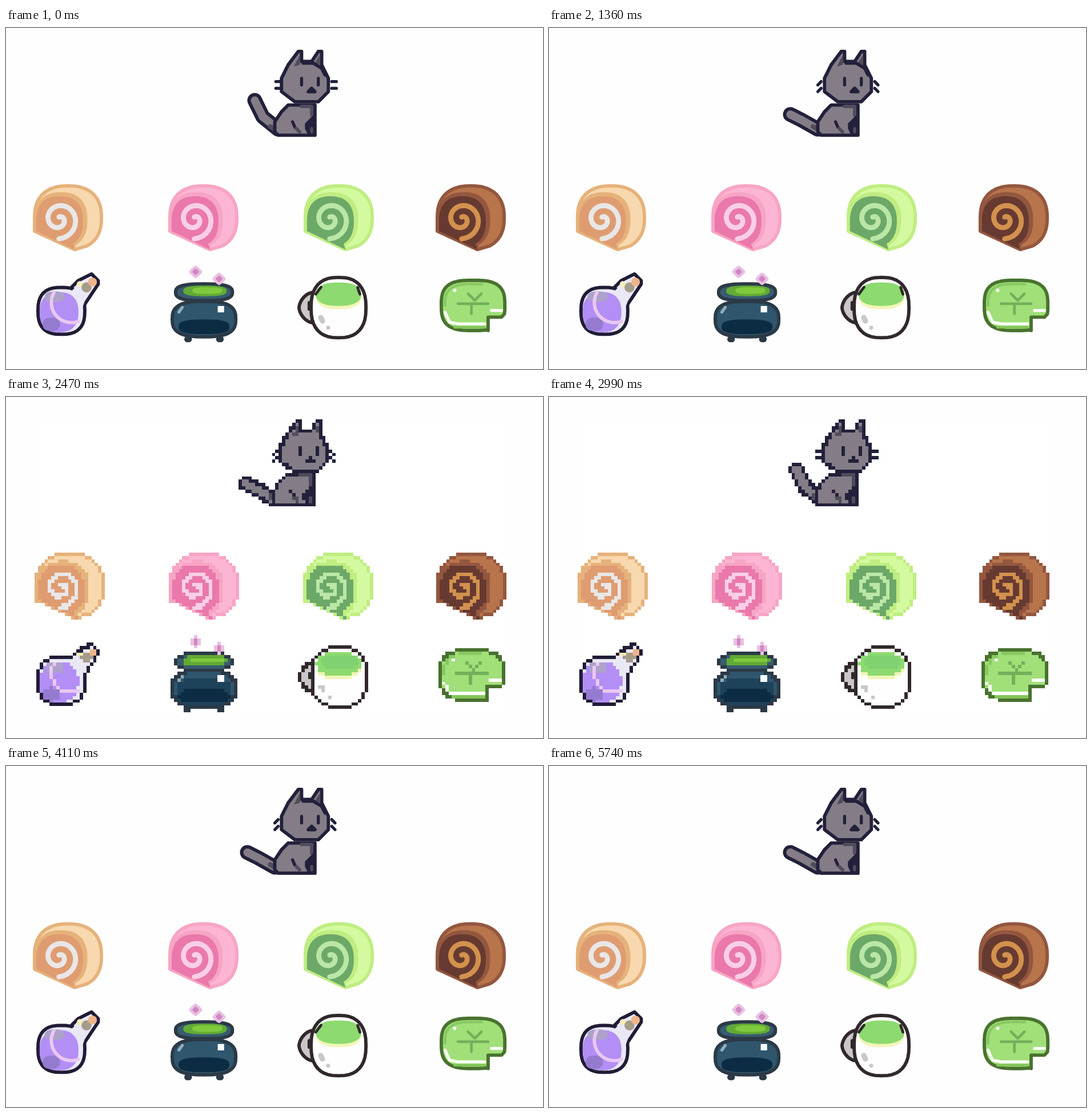
Animation, 940 px wide and 596 px high, one loop 5.77 s. Source, as an HTML page with a canvas:

```html
<!DOCTYPE html>
<html lang="en">
<head>
<meta charset="utf-8">
<title>Cat and treats</title>
<style>
html, body { margin: 0; width: 100%; height: 100%; overflow: hidden; background: #fefefe; }
canvas { display: block; width: 940px; height: 596px; }
</style>
</head>
<body>
<canvas id="stage" width="940" height="596"></canvas>
<script>
const CELL = 5.86;
const LOOP = 5770;
const TAIL_BEAT = 272;
const PIXEL_FROM = 1580, PIXEL_TO = 3750;

// Paths use cell units: whole coordinates are cell centres.
const shape = (d, fill, stroke, width, only) => ({ path: new Path2D(d), fill, stroke, width, only });
const area = (d, fill, only) => shape(d + 'z', fill, null, 1, only);
const line = (d, stroke, width = 1, only) => shape(d, null, stroke, width, only);
const outlined = (d, fill, stroke) => shape(d + 'z', fill, stroke, 1);
const dot = (x, y, color, size, only) => line(`M${x} ${y}h.01`, color, size, only);

// Samples a curve of t in 0..1 into an open path.
function curve(pointAt, steps = 40) {
  const points = Array.from({ length: steps + 1 }, (_, i) => pointAt(i / steps).map(v => v.toFixed(2)).join(' '));
  return 'M' + points.join('L');
}

// Superellipse arc in degrees: power 1 is a diamond, 2 an ellipse, more is boxier.
function blob(cx, cy, rx, ry, power = 2.4, from = 0, to = 360) {
  const bend = v => Math.sign(v) * Math.abs(v) ** (2 / power);
  return curve(t => {
    const angle = (from + (to - from) * t) * Math.PI / 180;
    return [cx + rx * bend(Math.cos(angle)), cy + ry * bend(Math.sin(angle))];
  });
}

function spiral(cx, cy, radius, turns) {
  return curve(t => {
    const angle = Math.PI / 2 - t * turns * 2 * Math.PI;
    const r = radius * (1 - t * .88);
    return [cx + r * Math.cos(angle), cy + r * Math.sin(angle)];
  });
}

function roll(border, light, face, cream) {
  const dome = (cx, cy, rx, ry) => blob(cx, cy, rx, ry, 2.4, 60, -180) + `L${cx - rx} 13.5L12 19`;
  return [
    outlined(dome(10, 9.5, 10, 9.5), light, border),
    area(dome(7.9, 10.2, 7.9, 8.3), border),
    area(dome(7.5, 10.6, 7, 7.5), face),
    line(spiral(7.3, 10, 5.8, 1.5), cream, 1.5),
  ];
}

function cat(tailDown) {
  const ink = '#22203a', fur = '#847d87', shade = '#514c5c';
  const tail = tailDown ? 'M1.8 18.8L5 20.4 10 23.2' : 'M4 14.6L6.4 19.5 11 23.2';
  const whiskers = [9, 11].map(row => tailDown
    ? `M11 ${row}l-1 1M27 ${row}l1 1`
    : `M10.3 ${row}H12M27 ${row}H28.4`).join('');
  return [
    line(tail, ink, 4.4),
    line(tail, fur, 2.4),
    line('M8.6 22.4L9.6 23', shade, 1.4),
    outlined('M15 16H22V25H11L10 24V21L12 18 14 16', fur, ink),
    line('M18 16.4H21L21 19', shade),
    area('M19 21.5L22 18.5V25H20L19 23', ink),
    line('M21 23V24', shade, .9),
    line('M15.3 21L16 22.6', ink, .9),
    line('M16.4 23L17.4 24', shade),
    outlined('M17 0H18V3H21L23 0H24V4L26 8V12L23 15H16L12 12V8L14 4', fur, ink),
    area('M15.7 4.5L17.5 1V4', shade),
    area('M22 3.4L23.5 1V4', shade),
    line('M18.5 3.5H21.5L24 5 25 7', ink, 1, 'smooth'),
    line('M18 8V10M23 8V10', ink, .9),
    outlined('M21 11L22 12H20', ink, ink),
    line(whiskers, ink, .9),
    ...(tailDown ? [dot(11.2, 10, '#fefefe', .6, 'smooth')] : []),
  ];
}

function bottle() {
  const ink = '#201c36', glass = '#e9e8f4';
  return [
    outlined(blob(7, 11, 7, 7, 2.6), glass, ink),
    outlined('M10 4L12 2 16 0 18 2V3L14 9', glass, ink),
    area('M9 6L11.4 3.8 14.2 7.5 13.3 10', glass),
    area(blob(6.3, 11.4, 5.8, 6), '#b28ef5'),
    area(blob(5, 6.8, 3, 1.6), '#ada2ca'),
    area(blob(4, 15, 2.6, 2), '#957bd0'),
    line(blob(10, 8.5, 6, 6, 2, 210, 70), '#eac8f0'),
    dot(12.5, 3, '#f5edbd', 1.8),
    dot(14.5, 4, '#a59c89', 3),
    dot(16.3, 2.4, '#efb48a', 2.6),
  ];
}

function cauldron() {
  const ink = '#2c3946';
  const sparkle = (x, y) => [area(blob(x, y, 2, 1.9, 1.2), '#eabfe3'), area(blob(x, y, 1, 1, 1.2), '#cf88c1')];
  return [
    line('M4.5 21.5H5M14 21.5H14.5', ink, 1.8),
    outlined(blob(9.5, 15.5, 9.5, 5.3, 2.8), '#2f566d', ink),
    area(blob(9.5, 16.5, 8.5, 4, 2.8), '#1d4259', 'pixel'),
    area(blob(9.5, 17.8, 7.6, 2.2, 2.8), '#0c2c43'),
    outlined(blob(9.5, 7.5, 8.5, 2.5, 2.8), '#385c70', ink),
    area(blob(9.8, 7.1, 6.5, 1.6, 2.8), '#62aa35'),
    area(blob(10.5, 7, 4.5, 1, 2.8), '#7fca3c'),
    line('M2 13.4L3 12', '#91adbb', .9),
    area('M13.6 11.6H15.5V13.5H13.6', '#f9feff'),
    ...sparkle(7, 1.4),
    ...sparkle(14, 3.5),
  ];
}

function mug() {
  const ink = '#30282b', shadow = '#cbc7c8';
  return [
    outlined(blob(4, 9, 4, 4.5, 1.7), shadow, ink),
    line('M3 7.5V9.5', ink, .9),
    outlined(blob(11.8, 9, 8.2, 9, 2.5), '#fefefe', ink),
    area(blob(11.8, 5.7, 6.8, 3.8), '#f1f6b5'),
    area(blob(11.8, 5, 6.8, 3.5), '#8dda70'),
    area(blob(11.8, 4.6, 5.5, 2.4), '#7fd26f', 'pixel'),
    line('M5 5L6.6 2.9M17.5 3L18.2 5', ink, .8, 'smooth'),
    line('M6.5 12L7 13', shadow, 1.6),
    dot(8.7, 15, shadow, 1.2),
  ];
}

function lilyPad() {
  const white = '#fafff7', vein = '#72b15a';
  return [
    outlined(blob(9.5, 7.5, 9.5, 7.5, 3, 71, 371) + 'L18 11H14V15', '#a1df79', '#49722f'),
    line(blob(9.5, 7.5, 8.4, 6.4, 3, 180, 280), '#88c963', .8),
    line('M4 14H13', '#83c65b', .8),
    line('M1.1 9.5L2.5 12.5 5 13H13M15 9H18', white, .9),
    line('M5 7H14M9 7V10M8 4L10 6 12 4', vein, .8),
    dot(4, 3, white, 1),
  ];
}

// Each sprite: shapes, smooth position, pixel position.
const items = [
  [roll('#e6b27b', '#f8d8ae', '#df9c71', '#e9e7e7'), [47, 273], [50, 272]],
  [roll('#f7a5c4', '#fcb5d3', '#ea78ab', '#f9cfe5'), [284, 273], [285, 272]],
  [roll('#c0ed82', '#d4fa9f', '#6ca868', '#bae7a6'), [521, 273], [520, 272]],
  [roll('#93573f', '#b8744b', '#673a31', '#d2914d'), [752, 273], [753, 272]],
  [bottle(), [53, 427], [53, 429]],
  [cauldron(), [288, 415], [288, 416]],
  [mug(), [510, 433], [511, 434]],
  [lilyPad(), [759, 438], [757, 439]],
];

function drawSmooth(ctx, shapes, [x, y]) {
  ctx.setTransform(CELL, 0, 0, CELL, x + CELL / 2, y + CELL / 2);
  for (const { path, fill, stroke, width, only } of shapes) {
    if (only === 'pixel') continue;
    if (fill) { ctx.fillStyle = fill; ctx.fill(path); }
    if (stroke) { ctx.lineWidth = width; ctx.strokeStyle = stroke; ctx.stroke(path); }
  }
}

function colorAt(ctx, shapes, col, row) {
  let color = null;
  for (const { path, fill, stroke, width, only } of shapes) {
    if (only === 'smooth') continue;
    ctx.lineWidth = width;
    if (fill && ctx.isPointInPath(path, col, row)) color = fill;
    if (stroke && ctx.isPointInStroke(path, col, row)) color = stroke;
  }
  return color;
}

function drawPixels(ctx, shapes, [x, y]) {
  const edge = (start, i) => Math.round(start + i * CELL);
  for (let row = 0; row < 27; row++) {
    for (let col = 0; col < 30; col++) {
      const color = colorAt(ctx, shapes, col, row);
      if (!color) continue;
      const left = edge(x, col), top = edge(y, row);
      ctx.fillStyle = color;
      ctx.fillRect(left, top, edge(x, col + 1) - left, edge(y, row + 1) - top);
    }
  }
}

function renderScene(pixelated, tailDown) {
  const canvas = document.createElement('canvas');
  canvas.width = 940;
  canvas.height = 596;
  const ctx = canvas.getContext('2d');
  ctx.fillStyle = '#fefefe';
  ctx.fillRect(0, 0, 940, 596);
  if (pixelated) {
    ctx.fillStyle = '#fff';
    ctx.fillRect(49, 36, 828, 515);
  }
  ctx.lineCap = ctx.lineJoin = 'round';
  const draw = pixelated ? drawPixels : drawSmooth;
  for (const [shapes, smoothAt, pixelAt] of [[cat(tailDown), [409, 38], [407, 39]], ...items]) {
    draw(ctx, shapes, pixelated ? pixelAt : smoothAt);
  }
  return canvas;
}

const scenes = [false, true].map(pixelated => [false, true].map(down => renderScene(pixelated, down)));
const stage = document.getElementById('stage').getContext('2d');

function frame() {
  const t = performance.now() % LOOP;
  const pixelated = t >= PIXEL_FROM && t < PIXEL_TO;
  const tailDown = Math.floor(t / TAIL_BEAT) % 2;
  stage.drawImage(scenes[+pixelated][tailDown], 0, 0);
  requestAnimationFrame(frame);
}
frame();
</script>
</body>
</html>
```
